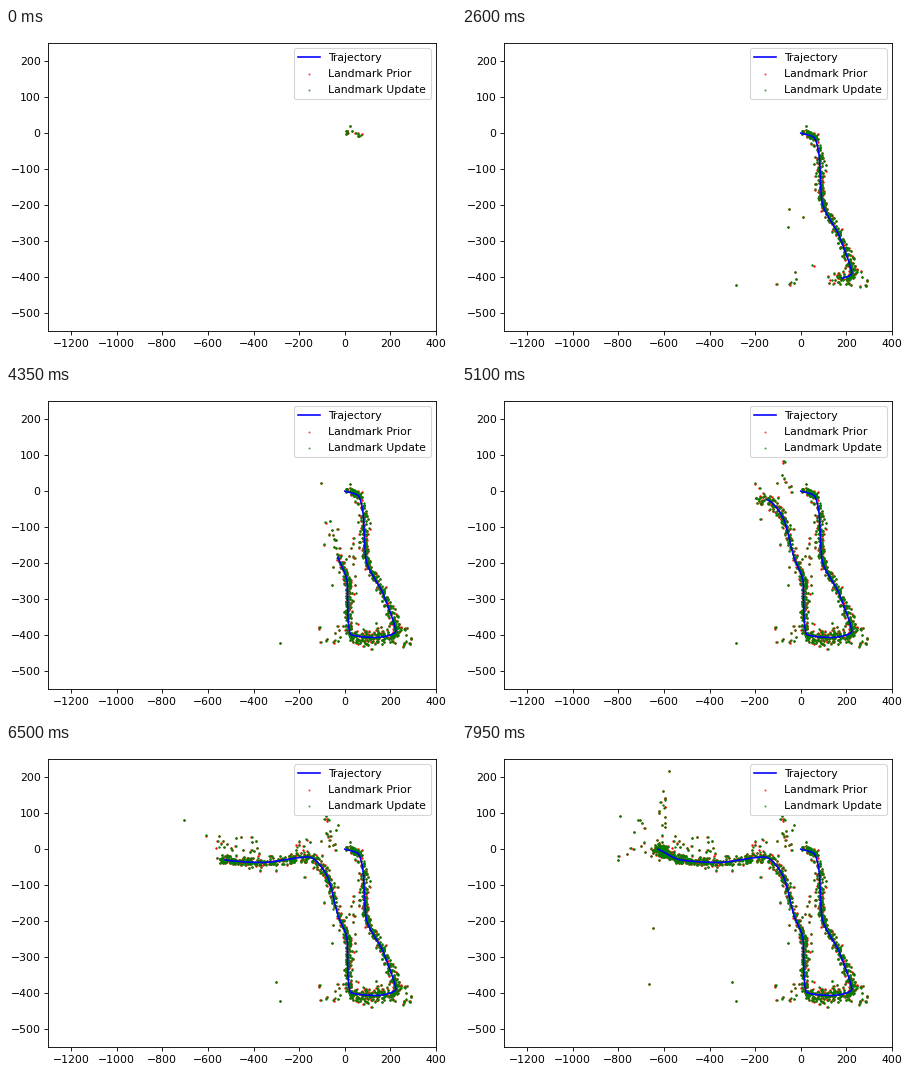
Animation, 450 px wide and 330 px high, one loop 8 s. Source, as a matplotlib script:

```python
import numpy as np
import matplotlib.pyplot as plt
from matplotlib.animation import FuncAnimation

W, H, DPI = 450, 330, 78.125
FRAMES, INTERVAL = 160, 50
LEFT, RIGHT, TOP, BOTTOM = 42.3, 430, 15, 303.4
UNIT = np.array([1700 / (RIGHT - LEFT), 800 / (BOTTOM - TOP)])

# route of the vehicle: frame, x, y
ROUTE = np.array([
    (0, 0, 0), (8, 58, -12), (13, 80, -60), (24, 92, -185),
    (35, 170, -287), (46, 224, -388), (56, 137, -406), (68, 27, -398),
    (73, 14, -350), (81, 11, -255), (87, -30, -183), (96, -78, -74),
    (103, -161, -22), (116, -360, -37), (130, -525, -30),
    (143, -600, -8), (159, -627, 0)], float)

# stretches with wider scatter: frame, width in frames, extra pixels
WIDE = [(57, 9, 2.4), (101, 4, 2), (155, 9, 1)]

# distant clouds: first frame, last frame, count, centre, half extent
CLOUDS = [
    (0, 0, 6, (6, 2), (4, 5)),
    (0, 0, 5, (62, -4), (15, 5)),
    (20, 34, 5, (0, -310), (60, 105)),
    (24, 35, 8, (205, -375), (28, 48)),
    (40, 66, 11, (-70, -395), (60, 25)),
    (42, 60, 12, (268, -412), (25, 40)),
    (56, 86, 16, (25, -230), (25, 110)),
    (74, 87, 7, (-60, -110), (35, 50)),
    (92, 112, 16, (-60, 45), (35, 50)),
    (100, 112, 8, (-180, 5), (35, 25)),
    (105, 116, 8, (-400, -5), (50, 45)),
    (118, 130, 16, (-510, 20), (100, 40)),
    (132, 158, 13, (-735, 20), (70, 75)),
    (136, 158, 12, (-607, 115), (14, 55)),
]

# single far landmarks: frame, x, y
LONERS = [(0, 23, 19), (0, 31, 6), (43, -284, -421), (80, -104, 22),
          (110, -560, -24), (120, -302, -368), (126, -705, 81),
          (140, -648, -218), (150, -666, -373), (152, -578, 217)]


def smooth(t, knots, values):
    """Monotone cubic interpolation: corners are rounded, never overshot."""
    h = np.diff(knots)
    slope = np.diff(values) / h
    a, b = slope[:-1], slope[1:]
    total = np.where(a * b > 0, a + b, 1)
    mid = np.where(a * b > 0, 2 * a * b / total, 0)
    m = np.concatenate([slope[:1], mid, slope[-1:]])
    i = np.clip(np.searchsorted(knots, t, side="right") - 1, 0, len(h) - 1)
    s = (t - knots[i]) / h[i]
    return (values[i] + h[i] * s * (1 - s) ** 2 * m[i]
            + s * s * (3 - 2 * s) * (values[i + 1] - values[i])
            - h[i] * s * s * (1 - s) * m[i + 1])


def position(t):
    return np.column_stack([smooth(t, ROUTE[:, 0], ROUTE[:, c])
                            for c in (1, 2)])


def make_landmarks(rng, per_frame=7):
    """Return birth frames, updated positions and prior positions."""
    t = rng.uniform(3, FRAMES - 1, per_frame * FRAMES)
    spread = 2.0 + sum(extra * np.exp(-((t - mid) / width) ** 2)
                       for mid, width, extra in WIDE)
    spread *= np.where(rng.random(len(t)) < 0.06, 2, 1)
    births = [np.maximum(1, t - rng.uniform(0, 5, len(t)))]
    spots = [position(t) + rng.normal(size=(len(t), 2))
             * spread[:, None] * UNIT]
    for start, stop, count, centre, extent in CLOUDS:
        births.append(np.linspace(start, stop, count))
        spots.append(centre + rng.uniform(-1, 1, (count, 2)) * extent)
    lone = np.array(LONERS)
    birth = np.concatenate(births + [lone[:, 0]])
    pos = np.vstack(spots + [lone[:, 1:]])
    error = np.where(rng.random(len(pos)) < 0.1, 1.2, 0.3)[:, None]
    return birth, pos, pos + rng.normal(size=pos.shape) * error * UNIT


birth, updates, priors = make_landmarks(np.random.default_rng(4))

fig = plt.figure(figsize=(W / DPI, H / DPI), dpi=DPI, facecolor="white")
ax = fig.add_axes([LEFT / W, 1 - BOTTOM / H,
                   (RIGHT - LEFT) / W, (BOTTOM - TOP) / H])
ax.set_xlim(-1300, 400)
ax.set_ylim(-550, 250)
ax.set_xticks(range(-1200, 401, 200))
ax.set_yticks(range(-500, 201, 100))

line, = ax.plot([], [], "b-", label="Trajectory")
dot = dict(s=1, linewidths=1.2)
red = ax.scatter([], [], color="r", label="Landmark Prior", **dot)
green = ax.scatter([], [], color="g", label="Landmark Update", **dot)
ax.legend(loc="upper right", labelspacing=0.57, markerscale=0.5)


def draw(k):
    line.set_data(*position(np.linspace(0, k, 4 * k + 1)).T)
    seen = birth <= k
    red.set_offsets(priors[seen])
    green.set_offsets(updates[seen])
    return line, red, green


anim = FuncAnimation(fig, draw, frames=FRAMES, interval=INTERVAL,
                     repeat=True, repeat_delay=0)
plt.show()
```
